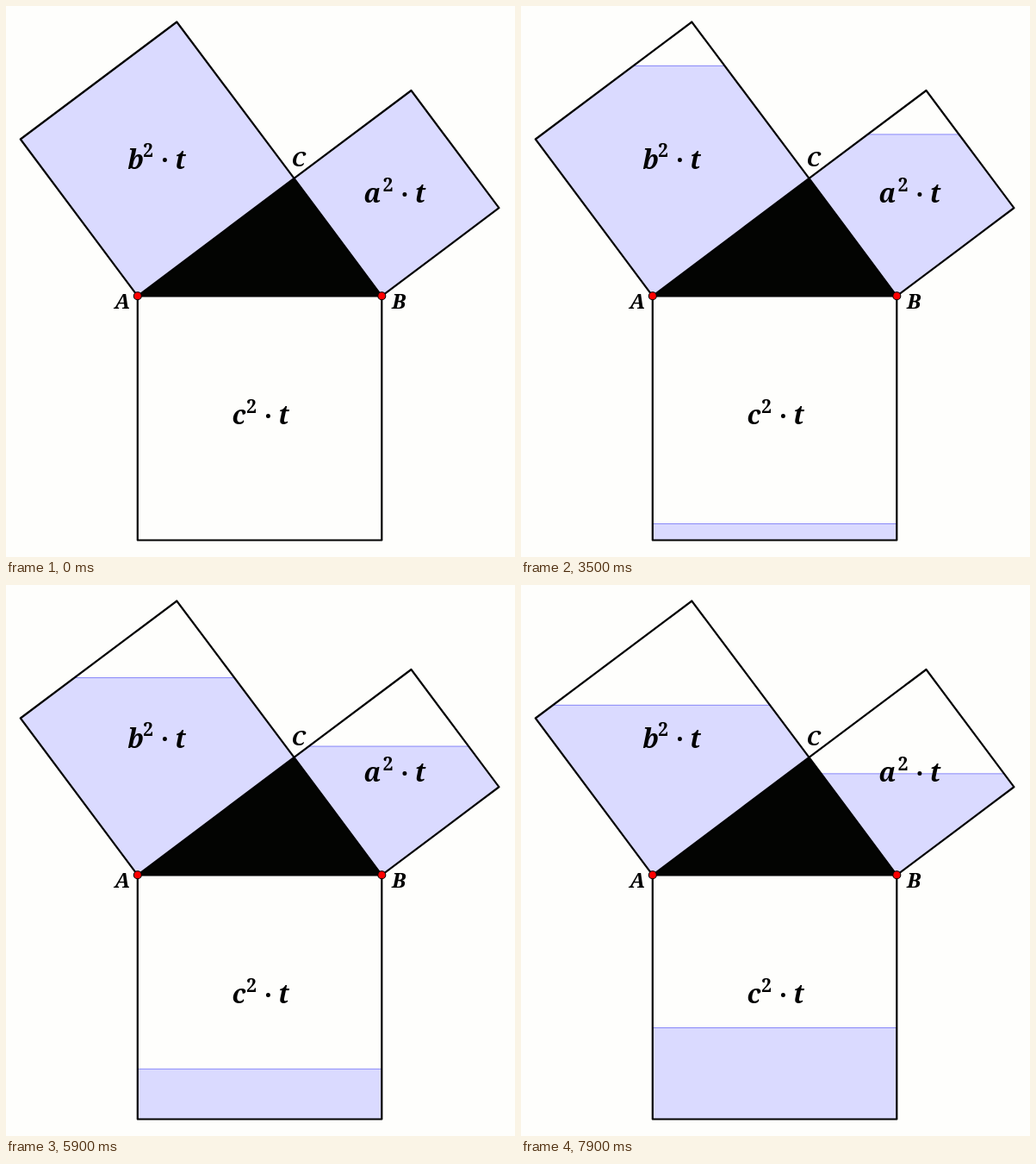
These frames come from a looping animation (591 by 639 pixels, 8 s). An HTML page:

```html
<!DOCTYPE html>
<html lang="en">
<head>
<meta charset="utf-8">
<style>
  html, body { margin: 0; width: 100%; height: 100%; overflow: hidden; background: #fefefc; }
  svg { display: block; width: 591px; height: 639px; }
  .water { fill: #dadaff; stroke: rgba(70, 70, 245, .6); stroke-width: 1; }
  .outline { fill: none; stroke: #000; stroke-width: 2.2; stroke-linejoin: round; }
  .triangle { fill: #030402; }
  .point { fill: #f00; stroke: #000; stroke-width: 1.1; }
  text { font: italic bold 30px "Noto Serif", "Liberation Serif", serif; text-anchor: middle; }
  .vertex { font-size: 24px; }
  .power { font-size: 21px; font-style: normal; }
  .dot { font-style: normal; }
</style>
</head>
<body>
<svg id="stage" viewBox="0 0 591 639"></svg>
<script>
const LOOP = 8000, HOLD = 500, STEP = 200, DROP = 3.18;
const A = [152.8, 336.3], B = [436.3, 336.3], C = [334.5, 199.8];
const SIDE_C = B[0] - A[0], BASE_C = 619.5;

const squares = {
  b: { corners: [A, C, [198.3, 18.5], [16.8, 154.5]], top: 18.5 },
  a: { corners: [C, B, [572.4, 234.2], [470.5, 98]], top: 98 },
  c: { corners: [A, B, [B[0], BASE_C], [A[0], BASE_C]], top: BASE_C }
};

const polygon = (corners, cls = "") => `<polygon class="${cls}" points="${corners.join(" ")}"/>`;
const text = (x, y, value, cls) => `<text x="${x}" y="${y}" class="${cls}">${value}</text>`;

// A formula is laid out around the centre of its multiplication dot.
const formula = (letter, x, y, offset) =>
  text(x - offset, y, letter, "") + text(x - 19.5, y - 13.5, "2", "power") +
  text(x, y + 1.5, "·", "dot") + text(x + 18, y, "t", "");

const entries = Object.entries(squares);
document.getElementById("stage").innerHTML =
  entries.map(([name, { corners }]) =>
    `<clipPath id="clip-${name}">${polygon(corners)}</clipPath>
     <g clip-path="url(#clip-${name})">
       <rect id="water-${name}" class="water" x="-5" width="601" height="700"/>
     </g>`).join("") +
  polygon([A, B, C], "triangle") +
  entries.map(([, { corners }]) => polygon(corners, "outline")).join("") +
  [A, B].map(([x, y]) => `<circle class="point" cx="${x}" cy="${y}" r="4.5"/>`).join("") +
  text(135, 350.5, "A", "vertex") + text(456, 350.5, "B", "vertex") + text(339.5, 185.5, "C", "vertex") +
  formula("b", 184.5, 188.5, 34) + formula("a", 463, 228, 37.5) + formula("c", 304.5, 485, 34);

// Area above a water line at the given depth below the top corner;
// the width grows until the nearer side corner, then stays constant.
function drainedArea(depth, corner) {
  const growth = 136 / 102 + 102 / 136;
  const d = Math.min(depth, corner);
  return growth * (d * d / 2 + corner * (depth - d));
}

function setLevel(name, y) {
  document.getElementById("water-" + name).setAttribute("y", y);
}

function draw(now) {
  const time = now % LOOP;
  const steps = time < HOLD ? 0 : Math.floor((time - HOLD) / STEP) + 1;
  const depth = steps * DROP;
  const drained = drainedArea(depth, 136) + drainedArea(depth, 102);
  setLevel("b", squares.b.top + depth);
  setLevel("a", squares.a.top + depth);
  setLevel("c", BASE_C - drained / SIDE_C);
  requestAnimationFrame(draw);
}
draw(performance.now());
</script>
</body>
</html>
```
